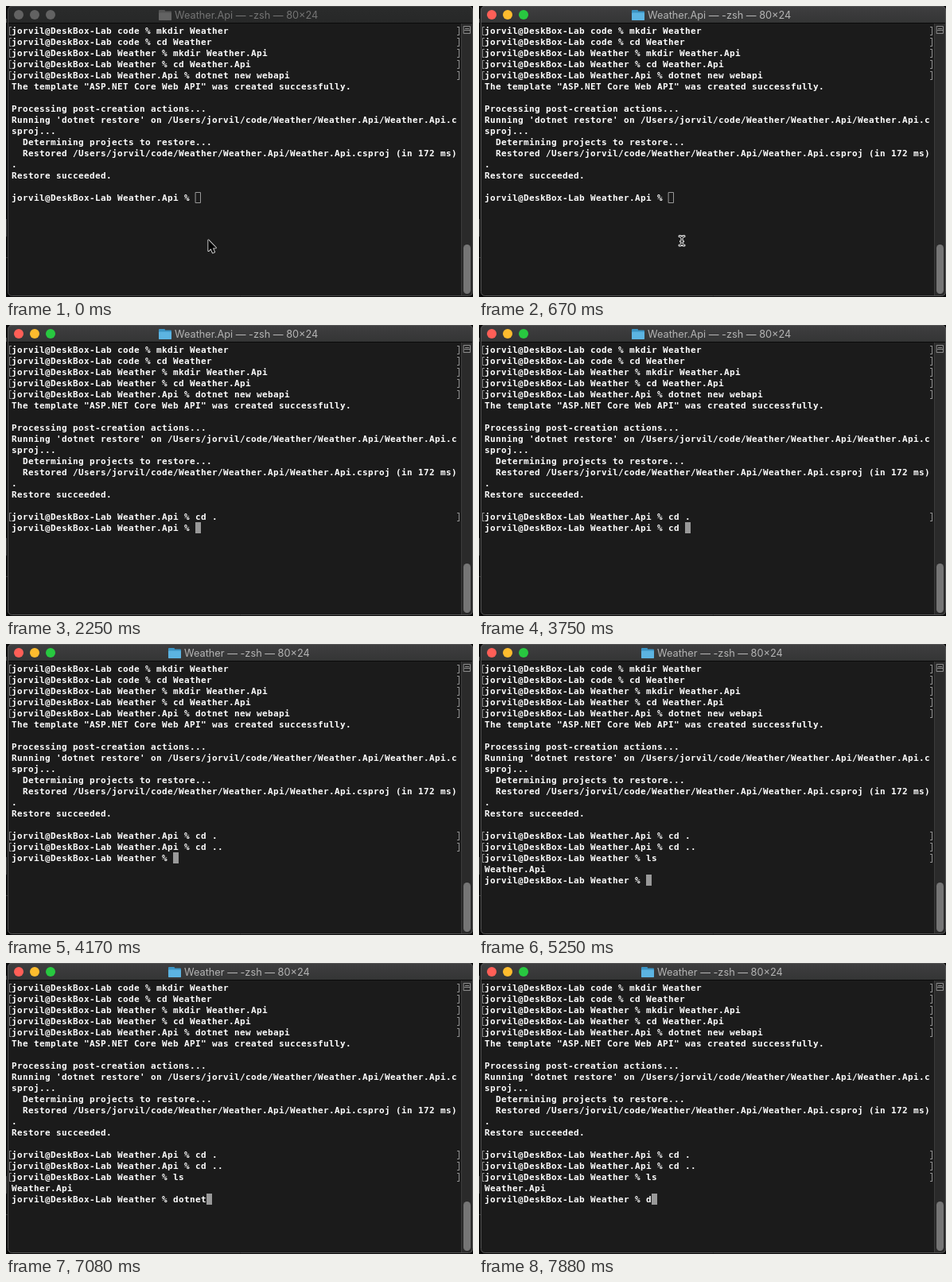
These frames come from a looping animation (587 by 366 pixels, 8 s). An HTML page with a canvas:

```html
<!DOCTYPE html>
<html lang="en">
<head>
<meta charset="utf-8">
<title>Terminal</title>
<style>
  html, body { margin: 0; width: 100%; height: 100%; overflow: hidden; background: #000; }
  canvas { display: block; width: 587px; height: 366px; }
</style>
</head>
<body>
<canvas id="stage" width="587" height="366"></canvas>
<script>
const ctx = document.getElementById('stage').getContext('2d');
const LOOP = 8000;
const CELL_W = 7, CELL_H = 14, LEFT = 7, TOP = 24;
const FOCUS = 630, IBEAM = 670, SOLID_CURSOR = 710, TITLE_CHANGE = 4170;
const USER = 'jorvil', HOST = 'DeskBox-Lab';

const prompt = dir => `${USER}@${HOST} ${dir} % `;
const entered = (dir, command) => ({ text: prompt(dir) + command, marked: true });
const output = text => ({ text, marked: false });

const history = [
  entered('code', 'mkdir Weather'),
  entered('code', 'cd Weather'),
  entered('Weather', 'mkdir Weather.Api'),
  entered('Weather', 'cd Weather.Api'),
  entered('Weather.Api', 'dotnet new webapi'),
  ...[
    'The template "ASP.NET Core Web API" was created successfully.',
    '',
    'Processing post-creation actions...',
    `Running 'dotnet restore' on /Users/${USER}/code/Weather/Weather.Api/Weather.Api.c`,
    'sproj...',
    '  Determining projects to restore...',
    `  Restored /Users/${USER}/code/Weather/Weather.Api/Weather.Api.csproj (in 172 ms)`,
    '.',
    'Restore succeeded.',
    ''
  ].map(output)
];

const keys = [
  [1540, 'c'], [1580, 'd'], [1750, ' '], [1960, '.'], [2250, '\n'],
  [3380, 'c'], [3500, 'd'], [3750, ' '], [3920, '.'], [4040, '.'], [4130, '\n'],
  [4750, 'l'], [4830, 's'], [5250, '\n'],
  ...[...'dotnet'].map((key, i) => [6580 + i * 100, key]),
  [7420, '\b'],
  ...[0, 1, 2, 3].map(i => [7580 + i * 100, '\b'])
];

// Replays the keyboard up to the given time.
function session(time) {
  const lines = [...history];
  let dir = 'Weather.Api', input = '';
  for (const [at, key] of keys) {
    if (at > time) break;
    if (key === '\b') input = input.slice(0, -1);
    else if (key !== '\n') input += key;
    else {
      lines.push(entered(dir, input));
      if (input === 'cd ..') dir = 'Weather';
      if (input === 'ls') lines.push(output('Weather.Api'));
      input = '';
    }
  }
  lines.push(output(prompt(dir) + input));
  return lines;
}

function rect(x, y, w, h, color) {
  ctx.fillStyle = color;
  ctx.fillRect(x, y, w, h);
}

function rounded(x, y, w, h, r, color) {
  ctx.beginPath();
  ctx.roundRect(x, y, w, h, r);
  ctx.fillStyle = color;
  ctx.fill();
}

function drawFolder(x, active) {
  rounded(x, 5, 8, 5, 1, active ? '#3b94c4' : '#555');
  rounded(x, 6.5, 16, 11.5, 1, active ? '#3b94c4' : '#555');
  rounded(x, 8.5, 16, 9.5, 1, active ? '#5cb4e2' : '#636363');
}

function drawTitleBar(active, dir) {
  const shade = ctx.createLinearGradient(0, 1, 0, 21);
  shade.addColorStop(0, active ? '#3e3e3f' : '#2a2b2b');
  shade.addColorStop(1, active ? '#343535' : '#272828');
  rect(2, 0, 585, 21, shade);
  rect(2, 0, 585, 1, active ? '#5c5c5c' : '#414141');
  rect(2, 21, 585, 1, '#0a0a0a');

  ['#ff5f57', '#febc2e', '#28c840'].forEach((color, i) => {
    ctx.beginPath();
    ctx.arc(16 + i * 20, 11, 6, 0, Math.PI * 2);
    ctx.fillStyle = active ? color : '#626262';
    ctx.fill();
  });

  const x = dir === 'Weather' ? 204 : 192;
  drawFolder(x, active);
  ctx.font = '12.75px Inter, sans-serif';
  ctx.fillStyle = active ? '#b4b4b4' : '#747474';
  ctx.fillText(`${dir} — -zsh — 80×24`, x + 20, 16);
}

function drawScrollbar() {
  rect(572, 22, 14, 342, '#2a2a2a');
  rect(572, 22, 1, 342, '#3c3c3c');
  rounded(575, 300, 9, 62, 4.5, '#757575');
  ctx.strokeStyle = '#8c8c8c';
  ctx.lineWidth = 1;
  ctx.strokeRect(575.5, 25.5, 8, 9);
  rect(577, 28, 5, 1, '#8c8c8c');
  rect(576, 30, 7, 1, '#8c8c8c');
}

function drawMarks(y) {
  for (const [stem, tick] of [[4, 4], [569, 567]]) {
    rect(stem, y + 2, 1, 11, '#8f8f8f');
    rect(tick, y + 2, 3, 1, '#8f8f8f');
    rect(tick, y + 12, 3, 1, '#8f8f8f');
  }
}

function drawText(lines, solid) {
  ctx.font = 'bold 11px "DejaVu Sans Mono", monospace';
  lines.forEach(({ text, marked }, row) => {
    const y = TOP + row * CELL_H;
    ctx.fillStyle = '#fff';
    [...text].forEach((char, col) => ctx.fillText(char, LEFT + col * CELL_W, y + 11));
    if (marked) drawMarks(y);
  });
  const x = LEFT + lines.at(-1).text.length * CELL_W;
  const y = TOP + (lines.length - 1) * CELL_H;
  if (solid) rect(x, y, CELL_W, CELL_H, '#999');
  else {
    ctx.strokeStyle = '#999';
    ctx.lineWidth = 1;
    ctx.strokeRect(x + 0.5, y + 0.5, CELL_W - 1, CELL_H - 1);
  }
}

function outlined(path, outer, inner) {
  ctx.lineJoin = ctx.lineCap = 'round';
  ctx.strokeStyle = '#fff';
  ctx.lineWidth = outer;
  ctx.stroke(path);
  ctx.strokeStyle = '#000';
  ctx.lineWidth = inner;
  ctx.stroke(path);
}

const arrow = new Path2D('M254.5 294.5V308l3.1-2.9 2.3 5.2 2.1-.9-2.3-5.1h4.1Z');
const beam = new Path2D('M252 289.5Q255 289.5 255 292Q255 289.5 258 289.5M255 292V299M252 301Q255 301 255 299Q255 301 258 301M253.5 296H256.5');

function drawPointer(time) {
  if (time < IBEAM) {
    outlined(arrow, 2, 0.5);
    ctx.fillStyle = '#000';
    ctx.fill(arrow);
  } else if (time < keys[0][0]) outlined(beam, 3, 1);
}

function drawBackdrop() {
  rect(0, 0, 587, 366, '#080808');
  rect(0, 16, 1, 5, '#4a4a4a');
  rect(0, 268, 1, 22, '#444');
  rect(0, 316, 2, 1, '#333');
}

function draw(time) {
  const active = time >= FOCUS;
  drawBackdrop();
  ctx.save();
  ctx.beginPath();
  ctx.roundRect(2, 0, 585, 365, 5);
  ctx.clip();
  rect(2, 0, 585, 365, '#1b1b1b');
  drawTitleBar(active, time < TITLE_CHANGE ? 'Weather.Api' : 'Weather');
  drawScrollbar();
  ctx.restore();
  ctx.beginPath();
  ctx.roundRect(2.5, 0.5, 584, 364, 5);
  ctx.strokeStyle = active ? '#555' : '#484848';
  ctx.lineWidth = 1;
  ctx.stroke();
  drawText(session(time), time >= SOLID_CURSOR);
  drawPointer(time);
}

const start = performance.now();
function tick() {
  draw((performance.now() - start) % LOOP);
  requestAnimationFrame(tick);
}
tick();
</script>
</body>
</html>
```
